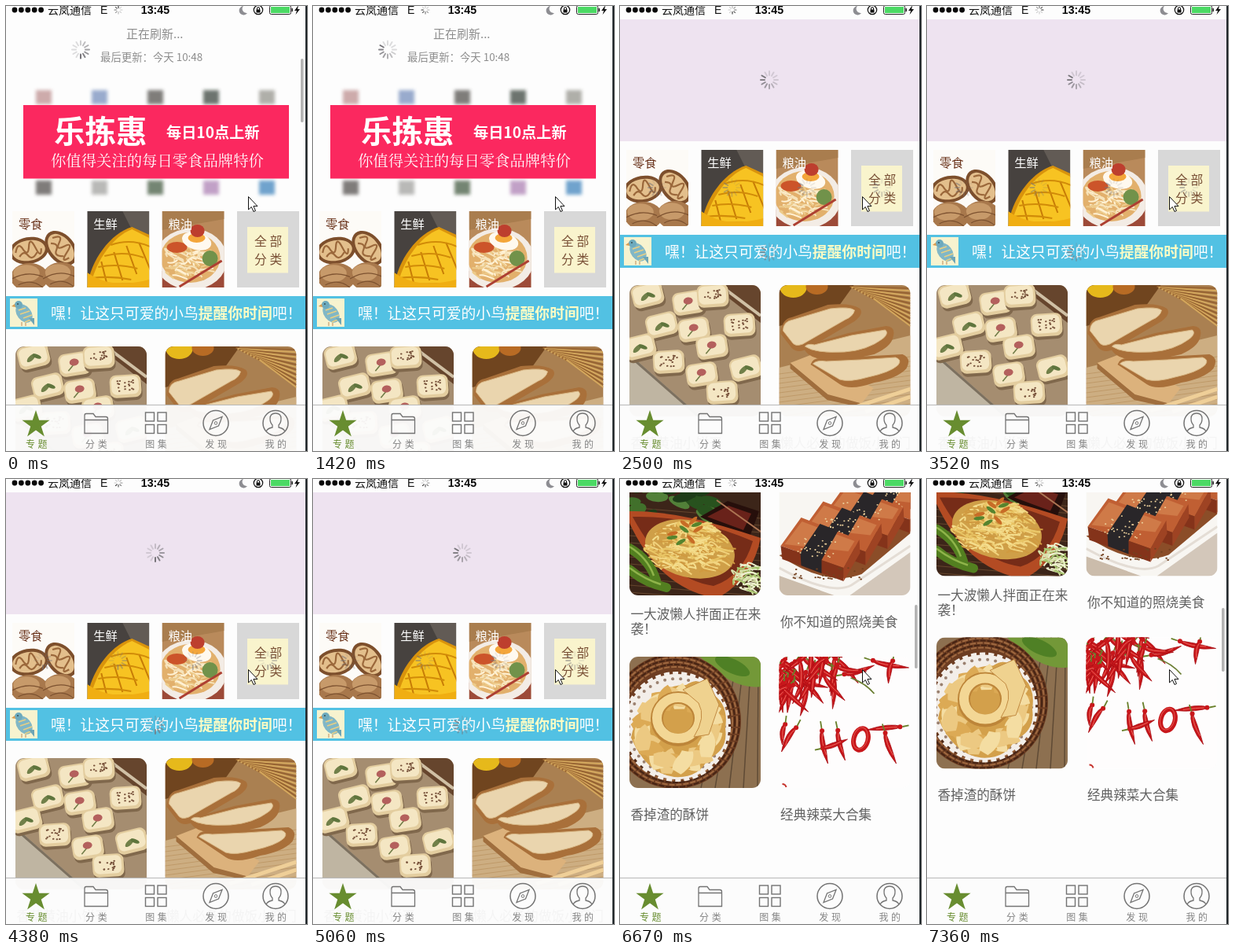
Animation of 383 by 566 pixels, one loop 8000 ms. Source, as an HTML page:

```html
<!DOCTYPE html>
<html lang="zh-CN">
<head>
<meta charset="utf-8">
<title>Snack app feed</title>
<style>
html, body { margin: 0; width: 100%; height: 100%; overflow: hidden; background: #fdfdfd; }
svg { display: block; }
text { font-family: "Noto Sans CJK SC", "Noto Sans CJK", "Noto Sans CJK JP", sans-serif; white-space: pre; }
.serif { font-family: "Noto Serif CJK SC", "Noto Sans CJK SC", "Noto Serif", serif; }
.latin { font-family: "Liberation Sans", Arial, sans-serif; }
</style>
</head>
<body>
<svg id="stage" width="383" height="566" viewBox="0 0 383 566"></svg>
<script>
const LOOP = 8000;

let seed = 7;
const rnd = (a = 0, b = 1) => {
  seed = (seed * 16807) % 2147483647;
  return a + (b - a) * seed / 2147483647;
};
const times = (n, f) => Array.from({ length: n }, (_, i) => f(i)).join('');

// Drawing helpers
const rect = (x, y, w, h, fill, more = '') =>
  `<rect x="${x}" y="${y}" width="${w}" height="${h}" fill="${fill}" ${more}/>`;
const oval = (x, y, rx, ry, fill, more = '') =>
  `<ellipse cx="${x}" cy="${y}" rx="${rx}" ry="${ry}" fill="${fill}" ${more}/>`;
const poly = (points, fill, more = '') => `<polygon points="${points}" fill="${fill}" ${more}/>`;
const path = (d, fill, more = '') => `<path d="${d}" fill="${fill}" ${more}/>`;
const line = (d, stroke, w = 1, more = '') =>
  `<path d="${d}" fill="none" stroke="${stroke}" stroke-width="${w}" ${more}/>`;
const group = (x, y, body, more = '') => `<g transform="translate(${x} ${y})" ${more}>${body}</g>`;
const turn = (a, x, y) => `transform="rotate(${a} ${x} ${y})"`;
// Text is placed by its vertical centre
const text = (x, cy, size, fill, s, more = '') =>
  `<text x="${x}" y="${cy + size * 0.38}" font-size="${size}" fill="${fill}" ${more}>${s}</text>`;

const spinner = (x, y, cls, n, inner, outer, w, color) => group(x, y,
  times(n, i => `<line y1="${-inner}" y2="${-outer}" stroke="${color}" stroke-width="${w}"
    stroke-linecap="round" transform="rotate(${i * 360 / n})"/>`), `class="${cls}"`);
const bigSpinner = (x, y) => spinner(x, y, 'big', 12, 6, 11, 2, '#77757a');

const noodles = (n, x, y, rx, ry, colors) => times(n, i => {
  const a = rnd(0, 6.3), d = Math.sqrt(rnd());
  const px = x + Math.cos(a) * d * rx, py = y + Math.sin(a) * d * ry;
  return line(`M${px} ${py}q${rnd(-14, 14)} ${rnd(-13, 3)} ${rnd(6, 20)} ${rnd(-6, 8)}`,
    colors[i % colors.length], 2);
});

// Category photos, 79 x 97
const walnut = (x, y, rx, ry) => oval(x, y, rx, ry, '#a8784c') +
  oval(x - 4, y - 5, rx * 0.7, ry * 0.6, '#c79a6a') +
  line(`M${x - rx} ${y + 3}q${rx} ${-ry * 0.8} ${rx * 2} 0m${-rx * 1.6} 7q${rx * 0.7} -9 ${rx * 1.3} 3`, '#7d5230', 1.3);
const halfNut = (x, y, a) => `<g ${turn(a, x, y)}>` + oval(x, y, 25, 17, '#7d4f2c') +
  oval(x, y, 21, 13, '#e3bf8c') +
  line(`M${x - 17} ${y}q5 -14 10 -3t8 -2t8 3t7 2M${x - 13} ${y + 6}q7 -8 11 0t12 -2`, '#9b683b', 2.2) + '</g>';
const walnuts = rect(0, 0, 79, 97, '#fdfbf7') + halfNut(21, 50, -10) + halfNut(62, 47, 50) +
  walnut(22, 84, 24, 18) + walnut(62, 83, 23, 18);

const mango = rect(0, 0, 79, 97, '#47423f') + poly('45,0 79,0 79,35 55,20', '#625b55') +
  path('M0 97C4 62 30 28 57 20L79 30V97Z', '#d9930c') +
  path('M5 92C12 62 33 32 57 23L79 34V91Z', '#f7c322') +
  times(4, i => line(`M${18 + i * 16} ${64 - i * 14 + i * i * 2}l${9 + i * 2} 36`, '#c77c06', 2)) +
  times(4, i => line(`M${30 - i * 8} ${43 + i * 14}q25 ${-9 + i * 2} 50 2`, '#d18b08', 2)) +
  path('M0 97V78Q30 100 79 87V97Z', '#f0ae12');

const soup = rect(0, 0, 79, 97, '#b98a5b') + poly('0,0 79,0 79,10 0,24', '#a97d4e') +
  rect(0, 76, 79, 21, '#9d4a38') + oval(37, 61, 46, 39, '#f3ece5') + oval(36, 59, 38, 32, '#e2b06c') +
  noodles(55, 27, 65, 27, 21, ['#f6e3ba', '#edcb8b', '#fff1d3']) +
  oval(19, 46, 13, 7, '#cc542a') + oval(61, 60, 10, 10, '#71924a') +
  oval(44, 38, 19, 11, '#fff9ef', turn(15, 44, 38)) + oval(44, 34, 11, 6, '#f4a63a') +
  oval(45, 25, 9, 8, '#bd3e2e') + line('M22 96L76 63', '#ad4032', 3);

// Feed photos, 167 x 167
const cookie = (x, y, i) => `<g ${turn(-14 + (i % 3) * 5, x, y)}>` +
  rect(x - 19, y - 10, 40, 29, '#80684c', 'rx="8"') +
  rect(x - 20, y - 14, 40, 29, '#e3cd9f', 'rx="8"') + rect(x - 18, y - 12, 35, 23, '#f4e6c3', 'rx="7"') +
  (i % 3 == 0 ? oval(x - 4, y, 7, 3, '#718049', turn(-30, x, y)) + oval(x + 4, y - 1, 6, 2.5, '#5f753d', turn(35, x, y))
    : i % 3 == 1 ? line(`M${x} ${y}l-9 8`, '#6e7a45', 1.5) + oval(x, y - 2, 6, 4.5, '#b4605d')
    : times(18, () => oval(x + rnd(-11, 11), y + rnd(-7, 7), 1.3, 1, '#765039'))) + '</g>';
const spots = [23, 12, 75, 22, 106, 13, 41, 50, 82, 56, 140, 50, 13, 78, 105, 78, 50, 97, 148, 105, 92, 113, 118, 136];
const cookies = rect(0, 0, 167, 167, '#a58d70') + poly('105,0 167,0 167,48', '#66452d') +
  poly('0,88 90,167 0,167', '#bfb5a2') + line('M0 90L88 167', '#7c705f', 3) + line('M115 0L167 39', '#d0c0a5', 4) +
  times(spots.length / 2, i => cookie(spots[i * 2], spots[i * 2 + 1], i));

const slice = (crust, crumb) => path(crust, '#a9703a') + path(crumb, '#ead5ae', 'stroke="#d9b988"');
const bread = rect(0, 0, 167, 167, '#aa8051') + poly('0,0 95,0 70,35 0,52', '#70451f') +
  oval(18, 3, 17, 13, '#e6b91b') + oval(48, 2, 14, 10, '#b86b24') +
  times(16, i => line(`M${90 + i * 2} ${2 + i}L167 ${4 + i * 3.2}`, i % 2 ? '#d5a85d' : '#986431', 2)) +
  poly('0,105 167,64 167,167 0,167', '#cdae82') +
  times(13, i => line(`M0 ${113 + i * 6}L167 ${91 + i * 6}`, '#bb9562', 0.8)) +
  poly('14,99 45,87 120,131 103,153 62,140', '#dcb27c') + poly('14,99 62,139 103,150 102,155 61,146 14,106', '#a06e3d') +
  slice('M2 62Q3 43 16 41L62 25Q92 22 103 30Q108 37 96 46L38 80Q24 88 16 80Z',
    'M5 58Q5 46 18 44L65 30Q90 27 96 32Q94 40 84 44L30 75Q20 79 16 72Z') +
  slice('M31 79Q33 73 43 74L88 61L136 52Q149 53 145 66Q143 78 121 88Q85 97 48 93Q34 89 31 79Z',
    'M33 78Q36 74 45 76L92 64L135 57Q140 61 132 68Q112 83 83 85Q46 87 33 78Z') +
  slice('M40 101Q43 91 58 93L101 91L157 88Q169 93 162 106Q150 119 121 124Q90 135 77 126Z',
    'M43 100Q48 95 60 97L103 95L148 92Q157 95 151 102Q141 111 113 117Q89 124 77 120Z') +
  line('M82 160L167 132M110 161L167 142', '#efcf98', 5);

const noodleDish = rect(0, 0, 167, 167, '#3c2519') +
  times(14, i => line(`M0 ${55 + i * 9}L167 ${69 + i * 9}`, '#65452d', 1.2)) +
  times(60, i => oval(rnd(0, 118), rnd(0, 50), rnd(7, 15), rnd(4, 8), ['#28521e', '#41702b', '#1d3c18', '#528039'][i % 4],
    turn(rnd(-40, 40), 60, 25))) +
  poly('90,67 125,47 165,60 151,98', '#260f0b') + poly('99,67 126,53 155,63 145,84', '#69221a') + line('M111 46L167 86', '#ad7553', 2) +
  path('M0 60Q62 58 167 94Q157 143 118 167H95Q35 150 0 75Z', '#b34b23') +
  path('M4 67Q80 65 157 98Q144 143 107 155Q46 146 4 67Z', '#762c18') +
  oval(77, 108, 58, 36, '#cf9f48', turn(14, 77, 108)) +
  noodles(210, 69, 108, 52, 32, ['#e9c565', '#f4dd8c', '#d09a40', '#f1d27c']) +
  times(9, i => oval(rnd(50, 103), rnd(80, 95), 7, 2.5, i % 2 ? '#56842e' : '#c86c26', turn(rnd(-50, 50), 76, 91))) +
  noodles(45, 146, 146, 17, 17, ['#d8e0a9', '#a6c56d', '#edf0ce']) +
  line('M0 107Q26 122 34 148M0 134Q19 151 47 157', '#537f20', 12, 'stroke-linecap="round"') +
  line('M0 105Q23 119 31 142M0 132Q20 147 40 153', '#8fb44a', 2.5);

const slab = (x, y) => group(x, y,
  poly('0,0 26,-36 100,-8 80,28', '#c05f33') + poly('5,-2 27,-31 94,-6 86,7', '#cf7a48') +
  poly('0,0 80,28 80,45 2,17', '#84331a') + poly('80,28 100,-8 101,9 80,45', '#9e4323') +
  poly('25,9 50,-28 73,-19 52,18 52,35 26,25', '#292629') +
  times(30, () => oval(rnd(22, 72), rnd(-15, 15), 1.1, 0.9, '#ecd09b')));
const teriyaki = rect(0, 0, 167, 167, '#f8f6f2') + oval(24, 8, 42, 22, '#e4e0da') + oval(24, 6, 32, 15, '#fbfaf8') +
  oval(30, 4, 24, 9, '#57472f') + poly('98,0 167,0 167,30', '#d6ccc0') +
  poly('0,142 70,167 0,167', '#cbbcab') + poly('167,112 167,167 90,167', '#d3c7ba') +
  line('M0 132Q66 168 92 154L167 104', '#e4ddd5', 3) +
  path('M0 116Q60 157 105 140L167 88V70Z', '#8b4d28') +
  times(5, i => slab(114 - i * 28, 22 + i * 20.5)) +
  times(32, () => oval(rnd(18, 108), rnd(132, 147), 1.3, 1, '#72401f'));

const crisps = rect(0, 0, 167, 167, '#8d7050') +
  times(9, i => line(`M${110 + i * 9} 0L${55 + i * 18} 167`, '#5f4a35', 1.5)) +
  path('M90 0H167V38Q132 43 90 0Z', '#739838') + oval(131, 12, 24, 9, '#4f8025', turn(25, 131, 12)) +
  oval(58, 82, 84, 86, '#6d3d22') +
  times(6, i => oval(58, 82, 82 - i * 3, 84 - i * 3, 'none', `stroke="${i % 2 ? '#9f6940' : '#462414'}" stroke-width="2" stroke-dasharray="7 2"`)) +
  oval(60, 89, 66, 67, '#f3eee9', 'stroke="#f3eee9" stroke-width="6" stroke-dasharray="7 4"') +
  times(38, i => oval(60 + 61 * Math.cos(i * 0.1654), 89 + 61 * Math.sin(i * 0.1654), 2, 2, '#9b8170')) +
  path('M2 103Q8 70 34 63Q40 35 72 36Q91 23 103 46Q127 59 122 91Q126 119 100 130Q88 155 57 153Q22 149 2 103Z', '#d3a04b') +
  times(34, i => {
    const a = i * 2.4, x = 62 + 44 * Math.cos(a), y = 94 + 42 * Math.sin(a);
    return path(`M${x - 17} ${y}q14 -19 34 -8q-5 16 -27 19Z`, ['#ecc982', '#dcaa55', '#f4dda2'][i % 3], turn(rnd(-70, 70), x, y));
  }) +
  oval(62, 79, 27, 27, 'none', 'stroke="#bd8539" stroke-width="16"') +
  oval(62, 78, 27, 26, 'none', 'stroke="#f3d795" stroke-width="12"') +
  path('M68 42L99 28L114 61L101 99L82 102Q98 77 88 59Z', '#efd28f', 'stroke="#c18a42"');

const chili = (x1, y1, x2, y2, bend = 4, w = 6) => {
  const dx = x2 - x1, dy = y2 - y1, len = Math.hypot(dx, dy);
  const at = k => `${x1 + dx * 0.35 - dy / len * k} ${y1 + dy * 0.35 + dx / len * k}`;
  return path(`M${x1} ${y1}Q${at(bend + w)} ${x2} ${y2}Q${at(bend - w)} ${x1} ${y1}Z`, '#c8171b', 'stroke="#a70d13" stroke-width=".8"') +
    oval(x1 + dx * 0.07, y1 + dy * 0.07, 3, 3, '#c8171b') +
    line(`M${x1 + dx * 0.15} ${y1 + dy * 0.15}Q${at(bend)} ${x1 + dx * 0.75} ${y1 + dy * 0.75}`, '#ee665c', 1) +
    line(`M${x1} ${y1}l${-dx / len * 8} ${-dy / len * 8 - 1}`, '#69802b', 1.8);
};
const hot = rect(0, 0, 167, 167, '#fefdfd') +
  times(36, i => {
    const x = rnd(-8, 76), y = rnd(-12, 42 - x * 0.35), a = i % 3 ? rnd(1.5, 2.5) : rnd(0.2, 0.9), n = rnd(38, 54);
    return chili(x, y, x + Math.cos(a) * n, y + Math.sin(a) * n, rnd(-6, 6));
  }) +
  chili(80, 23, 121, 11) + chili(70, 12, 111, 19) + chili(116, 4, 165, 14) + chili(145, 3, 139, 34) +
  line('M91 27Q109 33 121 47', '#6b7e33', 1.8) +
  chili(23, 88, 3, 121) + chili(8, 84, 4, 112) +
  chili(54, 91, 62, 136) + chili(74, 91, 84, 132) + chili(53, 117, 87, 105, 2) +
  oval(104, 105, 9, 14, 'none', `stroke="#c8171b" stroke-width="6" ${turn(15, 104, 105)}`) +
  oval(103, 104, 9, 14, 'none', `stroke="#e3544d" stroke-width="1" ${turn(15, 104, 105)}`) +
  chili(157, 89, 112, 93, 1) + chili(134, 94, 149, 136) + line('M4 162q4 0 5 4', '#c6332d', 2);

const photo = (x, y, clip, body) => group(x, y, body, `clip-path="url(#${clip})"`);
const card = (col, row, body, captions) => {
  const x = col ? 202.5 : 12, y = 355 + row * 245, mid = y + 200.5;
  return photo(x, y, 'card', body) + captions.map((s, i) =>
    text(x + 1.5, mid + (i - (captions.length - 1) / 2) * 19, 16.6, '#606060', s)).join('');
};
const category = (i, body, label, fill) => photo(8 + i * 95.3, 183, 'cat', body) + text(16 + i * 95.2, 199, 15.3, fill, label);

const tones = ['#bd9090', '#7890bd', '#55524f', '#3d4640', '#96958e', '#55514f', '#a3a3a0', '#465d45', '#ae83b5', '#4385bd'];
const promo = `<g id="promo">` + rect(0, 17, 381, 155, '#fdfdfd') +
  `<g filter="url(#soft)" opacity=".75">` +
  tones.map((c, i) => rect(38 + (i % 5) * 71, i < 5 ? 29 : 144, 20, 18, c)).join('') + '</g>' +
  rect(22, 48, 338, 93.5, '#fb285f') +
  text(61, 81, 39.5, '#fff', '乐拣惠', 'font-weight="900"') +
  text(204, 82.5, 19.2, '#fff', '每日10点上新', 'font-weight="700"') +
  text(57, 119, 19.35, '#fff', '你值得关注的每日零食品牌特价', 'class="serif"') + '</g>';
const loading = `<g id="loading">` + rect(0, 17, 381, 155, '#eee3f0') + bigSpinner(190, 94) +
  times(4, i => `<g opacity=".55">${bigSpinner(47 + i * 95.4, 231)}</g>`) +
  `<g opacity=".75">${bigSpinner(190, 313)}</g></g>`;

const bird = rect(5, 294, 35, 36, '#f7f3cf') +
  oval(23, 313, 9, 13, '#81b7c6', turn(-38, 23, 313)) + oval(16, 302, 5, 5, '#6daabd') +
  poly('11,301 7,304 12,305', '#db9b4d') + oval(15, 301, 1, 1, '#344d57') +
  line('M16 309l9 -3M18 314l12 -4M22 319l11 -4M24 324l10 -4', '#e8cf83', 1.7) +
  poly('29,319 36,319 36,328', '#6da5b5') + line('M20 324v5M25 325v4', '#bd8b5a');

const feed = `<g id="feed">` + promo +
  category(0, walnuts, '零食', '#672f17') + category(1, mango, '生鲜', '#fff') + category(2, soup, '粮油', '#fff') +
  rect(294, 183, 79, 97, '#d8d8d8') + rect(307, 203, 52, 58.5, '#f9f4cd') +
  text(316, 220.5, 15.8, '#795036', '全部', 'letter-spacing="3.6"') +
  text(316, 243.5, 15.8, '#795036', '分类', 'letter-spacing="3.6"') +
  rect(0, 291, 381, 42, '#52c1e3') + bird +
  text(57, 312.5, 18.8, '#fff', '嘿！让这只可爱的小鸟<tspan fill="#fdfcc4" font-weight="700">提醒你时间</tspan>吧！') +
  card(0, 0, cookies, ['香草黄油小饼干']) + card(1, 0, bread, ['懒人必备的做饭小窍门']) +
  card(0, 1, noodleDish, ['一大波懒人拌面正在来', '袭！']) + card(1, 1, teriyaki, ['你不知道的照烧美食']) +
  card(0, 2, crisps, ['香掉渣的酥饼']) + card(1, 2, hot, ['经典辣菜大合集']) + loading + '</g>';

const refresh = `<g id="refresh">` + text(153, 35, 15, '#8c8c8c', '正在刷新...') +
  text(120, 65, 13.4, '#8c8c8c', '最后更新：今天 10:48') + bigSpinner(95, 55.5) + '</g>';

const status = rect(0, 0, 381, 17, '#fdfdfd') +
  times(5, i => oval(11 + i * 8.4, 5, 3.4, 3.4, '#080808')) +
  text(53, 5, 14, '#111', '云岚通信') + text(120, 5, 14, '#111', 'E', 'class="latin"') +
  spinner(143, 5, 'small', 8, 2.6, 5, 1.1, '#333') +
  text(190, 5, 14.2, '#080808', '13:45', 'class="latin" font-weight="700" text-anchor="middle"') +
  path('M302 0A5.7 5.7 0 1 0 307 9A5.5 5.5 0 0 1 302 0Z', '#8d8d92') +
  oval(321, 5, 5.7, 5.7, 'none', 'stroke="#111" stroke-width="1.2"') + rect(318.5, 4.5, 5, 4, '#111') +
  line('M319.5 5V3a1.5 1.5 0 0 1 3 0V5', '#111') +
  rect(335.5, -0.5, 27, 11, '#fff', 'rx="2" stroke="#222"') + rect(337, 1, 24, 8, '#4bd964') +
  rect(363.5, 3, 1.5, 4, '#222') + poly('372,-1 367,6 370,6 368.5,11 374,4 371,4', '#111');

const star = times(10, i => {
  const r = i % 2 ? 7.1 : 18.5, a = i * Math.PI / 5;
  return `${38 + r * Math.sin(a)},${532.5 - r * Math.cos(a)} `;
});
const GREY = '#737373';
const tabs = rect(0, 507, 381, 59, '#fcfcfc', 'opacity=".95"') + rect(0, 507, 381, 1, '#b8b8b8') +
  poly(star, '#688d30') +
  line('M100 543.5V521q0 -2.5 2 -2.5h9l3 4h13q2.5 0 2.5 2.5v18.5zM100 526.5h29.5', GREY, 1.3) +
  times(4, i => rect(177.5 + (i % 2) * 15.5, i < 2 ? 517 : 532.5, 11, 11, 'none', `stroke="${GREY}" stroke-width="1.4"`)) +
  oval(267, 530.5, 16, 16, 'none', `stroke="${GREY}" stroke-width="1.5"`) +
  line('M275 522.5L270.5 534L259 538.5L263.5 527Z', GREY, 1.3) + oval(267, 530.5, 1.8, 1.8, 'none', `stroke="${GREY}"`) +
  oval(343, 530.5, 16, 16, 'none', `stroke="${GREY}" stroke-width="1.5"`) +
  line('M331 541q2 -4 8 -5v-3q-3 -3 -3 -8q0 -7 7 -7t7 7q0 5 -3 8v3q6 1 8 5', GREY, 1.3) +
  ['专题', '分类', '图集', '发现', '我的'].map((s, i) =>
    text(25 + i * 76.1, 557.5, 12, i ? '#858585' : '#688d30', s, `letter-spacing="3.6" font-weight="${i ? 400 : 500}"`)).join('');

const cursor = path('M308.5 242.5v16.5l3.8-3.5 2.7 6 2.5-1.1-2.6-5.8h5.1z', '#fff', 'stroke="#111"');

const stage = document.getElementById('stage');
stage.innerHTML = `<defs>
  <clipPath id="card"><rect width="167" height="167" rx="11"/></clipPath>
  <clipPath id="cat"><rect width="79" height="97"/></clipPath>
  <filter id="soft"><feGaussianBlur stdDeviation="2"/></filter></defs>` +
  rect(0, 0, 383, 566, '#fdfdfd') + refresh + feed +
  rect(375, 0, 3.5, 81, '#b3b3b3', 'id="bar" rx="1.7"') + tabs + status + cursor + rect(381, 0, 2, 566, '#20262a');

// Spinner ticks: [time, does the status spinner move too]
const ticks = [[0, 0], [280, 1], [560, 0], [860, 1], [1420, 0], [1820, 1], [2130, 1], [2500, 0], [2940, 1],
  [3210, 0], [3520, 1], [3980, 0], [4380, 1], [5060, 0], [6020, 1], [6670, 1], [7360, 1]];
// [time, scroll offset, scroll bar top or null]
const views = [[0, -78, 67], [280, -78, null], [1820, 0, null], [6020, 390, 126.5], [6670, 619, 160], [7360, 643.5, 164]];

const byId = id => document.getElementById(id);
const show = (id, on) => byId(id).setAttribute('visibility', on ? 'visible' : 'hidden');
const spin = (cls, head) => stage.querySelectorAll('.' + cls).forEach(g => {
  const n = g.children.length;
  [...g.children].forEach((spoke, i) => {
    const lag = (((head - i) % n) + n) % n;
    spoke.setAttribute('opacity', Math.max(0.24, 1 - lag * 1.3 / n));
  });
});

function draw(t) {
  const past = ticks.filter(k => k[0] <= t);
  const [, scroll, bar] = views.filter(v => v[0] <= t).pop();
  const pulling = scroll < 0;
  spin('big', 6 + (past.length - 1) * 4);
  spin('small', past.reduce((sum, k) => sum + k[1], 0) * 3);
  byId('feed').setAttribute('transform', `translate(0 ${-scroll})`);
  show('refresh', pulling);
  show('promo', pulling);
  show('loading', !pulling);
  show('bar', bar !== null);
  if (bar !== null) byId('bar').setAttribute('y', bar);
}

const origin = performance.now();
function frame() {
  draw((performance.now() - origin) % LOOP);
  requestAnimationFrame(frame);
}
frame();
</script>
</body>
</html>
```
